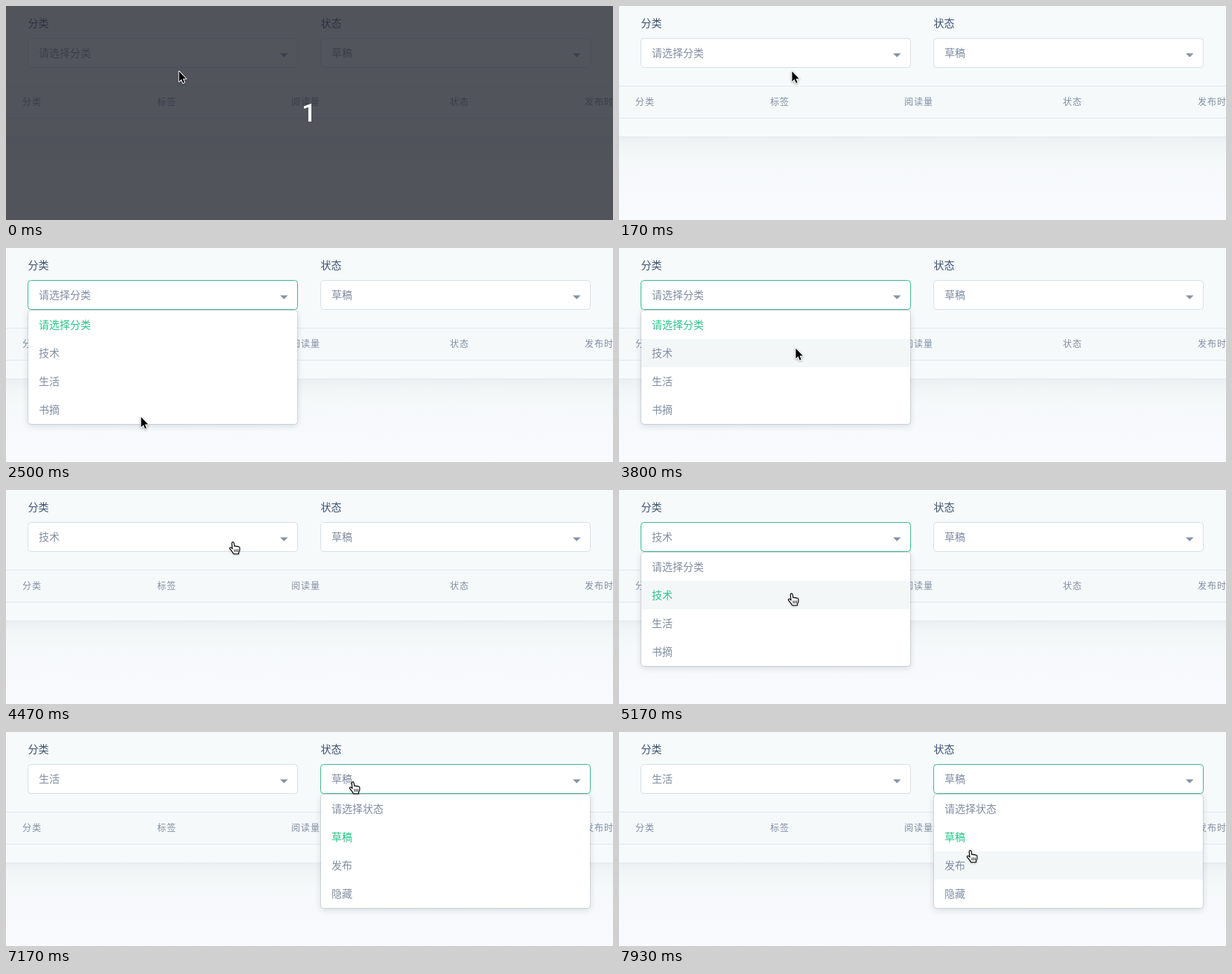
Recreate the animation shown at these times as an HTML page with a canvas. Size 815 by 287 pixels, loop 8 s.

```html
<!DOCTYPE html>
<html lang="zh-CN">
<head>
<meta charset="utf-8">
<title>下拉筛选</title>
<style>
html, body { margin: 0; width: 100%; height: 100%; overflow: hidden; background: #f7fafc; }
canvas { display: block; width: 815px; height: 287px; }
</style>
</head>
<body>
<canvas id="stage" width="815" height="287"></canvas>
<script>
const ctx = document.getElementById('stage').getContext('2d');
const W = 815, H = 287, LOOP = 8000;
const LEAD = 130;   // the page reacts this long before the pointer is seen there
const STEP = 83;    // pointer refresh
const TOP = 84, ROW = 38, WIDTH = 363;
const CJK = '"Noto Sans CJK SC", "Noto Sans CJK", "Noto Sans", sans-serif';
const GREY = '#818ea3', GREEN = '#2bc48a', LINE = '#e3e9ed';

const boxes = [
  { x: 29, label: '分类', items: ['请选择分类', '技术', '生活', '书摘'] },
  { x: 422, label: '状态', items: ['请选择状态', '草稿', '发布', '隐藏'] }
];
const columns = [[22, '分类'], [203, '标签'], [383, '阅读量'], [596, '状态'], [777, '发布时间']];
const clicks = [1400, 3900, 4800, 5900, 7170];

// start, end, x, y
const moves = [
  [670, 1030, 261, 61],
  [1900, 2500, 181, 226],
  [2630, 2630, 184, 254],
  [2830, 3230, 231, 145],
  [3370, 3470, 237, 134],
  [4170, 4470, 304, 69],
  [5070, 5170, 231, 138],
  [5230, 5470, 207, 184],
  [6230, 6370, 412, 84],
  [6670, 6800, 465, 66],
  [7600, 8030, 473, 190]
];

const arrow = new Path2D('M.4 .8V14.2L3.5 11.3 5.6 16.3 7.6 15.4 5.5 10.6H9.8Z');
const hand = new Path2D('M5 10L4.2 2.4a1.4 1.4 0 0 1 2.8-.3L7.8 6.6q1.2-1.2 2.4.2 1.3-1 2.4.4 1.7-.6 2.2 1V11q0 2.4-1.4 4v1.7H6.5q-.4-1.6-2-3.4L1.4 9.7q-.3-1.9 1.5-1.7Q4.2 8.6 5 10Z');
const knuckles = new Path2D('M8 10.4v3.8M10.2 10.4v3.8M12.4 10.4v3.8');

const smooth = p => p * p * (3 - 2 * p);

// Every odd click opens a list, every even one picks the next item.
const clicked = t => clicks.filter(c => c <= t).length;
const isOpen = (i, t) => clicked(t) % 2 === 1 && i === (clicked(t) < 5 ? 0 : 1);
const picked = (i, t) => i === 0 ? clicked(t) >> 1 : 1;

function pointer(t) {
  let x = 232, y = 87;
  for (const [from, to, tx, ty] of moves) {
    if (t < from) break;
    const steps = Math.round((to - from) / STEP) + 1;
    const done = to > from ? Math.floor((t - from) / (to - from) * (steps - 1)) + 1 : 1;
    const e = smooth(Math.min(1, done / steps));
    x += (tx - x) * e;
    y += (ty - y) * e;
  }
  return [Math.round(x), Math.round(y)];
}

function isHand(t) {
  const [x, y] = pointer(t + LEAD);
  return boxes.some((box, i) => {
    const bottom = isOpen(i, t + LEAD) ? TOP + 4 * ROW : 82;
    return x > box.x && x < box.x + WIDTH && y > 43 && y < bottom;
  });
}

function text(str, x, y, color, size = 14, weight = 400, gap = 0) {
  ctx.font = `${weight} ${size}px ${CJK}`;
  ctx.letterSpacing = gap + 'px';
  ctx.fillStyle = color;
  ctx.fillText(str, x, y);
}

function round(x, y, w, h, r) {
  ctx.beginPath();
  ctx.roundRect(x, y, w, h, r);
}

function shadow(color, blur, dy) {
  ctx.shadowColor = color;
  ctx.shadowBlur = blur;
  ctx.shadowOffsetY = dy;
}

function page() {
  ctx.fillStyle = '#f6fafb';
  ctx.fillRect(0, 0, W, H);
  ctx.fillStyle = '#f5f9fa';
  ctx.fillRect(0, 108, W, 42);
  const g = ctx.createLinearGradient(0, 176, 0, H);
  g.addColorStop(0, '#ebeff1');
  g.addColorStop(0.1, '#f1f5f6');
  g.addColorStop(0.3, '#f6f9fa');
  g.addColorStop(1, '#f8fafd');
  ctx.fillStyle = g;
  ctx.fillRect(0, 176, W, H - 176);
  ctx.fillStyle = LINE;
  for (const y of [107, 150, 175]) ctx.fillRect(0, y, W, 1);
  for (const [x, name] of columns) text(name, x, 133, GREY, 12, 400, 1);
}

function field(i, t) {
  const { x, label, items } = boxes[i];
  text(label, x + 0.5, 28, '#3d5170', 14, 500);
  round(x + 0.5, 43.5, WIDTH - 1, 39, 4);
  ctx.fillStyle = '#fff';
  ctx.fill();
  ctx.lineWidth = 1;
  ctx.strokeStyle = isOpen(i, t) ? '#3fb98e' : '#d7e0e5';
  ctx.stroke();
  text(items[picked(i, t)], x + 15, 68, GREY);
  ctx.beginPath();
  ctx.moveTo(x + 339, 63.4);
  ctx.lineTo(x + 349.5, 63.4);
  ctx.lineTo(x + 344.25, 68.8);
  ctx.fillStyle = '#8395a7';
  ctx.fill();
}

function list(i, t) {
  if (!isOpen(i, t)) return;
  const { x, items } = boxes[i];
  const hover = Math.floor((pointer(t + LEAD)[1] - TOP) / ROW);
  ctx.save();
  shadow('rgba(68,88,112,.22)', 9, 2);
  round(x + 1, TOP, WIDTH - 2, 4 * ROW, 4);
  ctx.fillStyle = '#fff';
  ctx.fill();
  ctx.restore();
  round(x + 0.5, TOP - 0.5, WIDTH - 1, 4 * ROW + 1, 4);
  ctx.strokeStyle = 'rgba(68,88,112,.14)';
  ctx.stroke();
  items.forEach((item, row) => {
    const y = TOP + row * ROW, chosen = row === picked(i, t);
    if (row === hover) {
      ctx.fillStyle = '#f4f7f8';
      ctx.fillRect(x + 1, y, WIDTH - 2, ROW);
    }
    text(item, x + 15, y + 24, chosen ? GREEN : GREY, 14, chosen ? 500 : 400);
  });
}

function cursor(t) {
  const [x, y] = pointer(t);
  const pointing = isHand(t);
  const shape = pointing ? hand : arrow;
  ctx.save();
  ctx.translate(pointing ? x - 5 : x, y);
  ctx.lineJoin = 'round';
  ctx.save();
  shadow('rgba(0,0,0,.35)', 3, 1);
  ctx.lineWidth = 2;
  ctx.strokeStyle = ctx.fillStyle = '#fff';
  if (pointing) ctx.fill(shape);
  else ctx.stroke(shape);
  ctx.restore();
  if (pointing) {
    ctx.strokeStyle = '#000';
    ctx.lineWidth = 1.1;
    ctx.stroke(shape);
    ctx.lineWidth = 0.9;
    ctx.stroke(knuckles);
  } else {
    ctx.fillStyle = '#000';
    ctx.fill(shape);
  }
  ctx.restore();
}

function countdown() {
  ctx.fillStyle = 'rgba(40,43,52,.8)';
  ctx.fillRect(0, 0, W, H);
  ctx.save();
  ctx.font = '500 34px Roboto, sans-serif';
  ctx.letterSpacing = '0px';
  ctx.textAlign = 'center';
  ctx.fillStyle = '#fff';
  ctx.fillText('1', 407, 155);
  ctx.restore();
}

function draw(t) {
  page();
  boxes.forEach((_, i) => field(i, t));
  boxes.forEach((_, i) => list(i, t));
  if (t < 170) countdown();
  cursor(t);
}

const start = performance.now();
function tick() {
  draw((performance.now() - start) % LOOP);
  requestAnimationFrame(tick);
}
tick();
</script>
</body>
</html>
```
